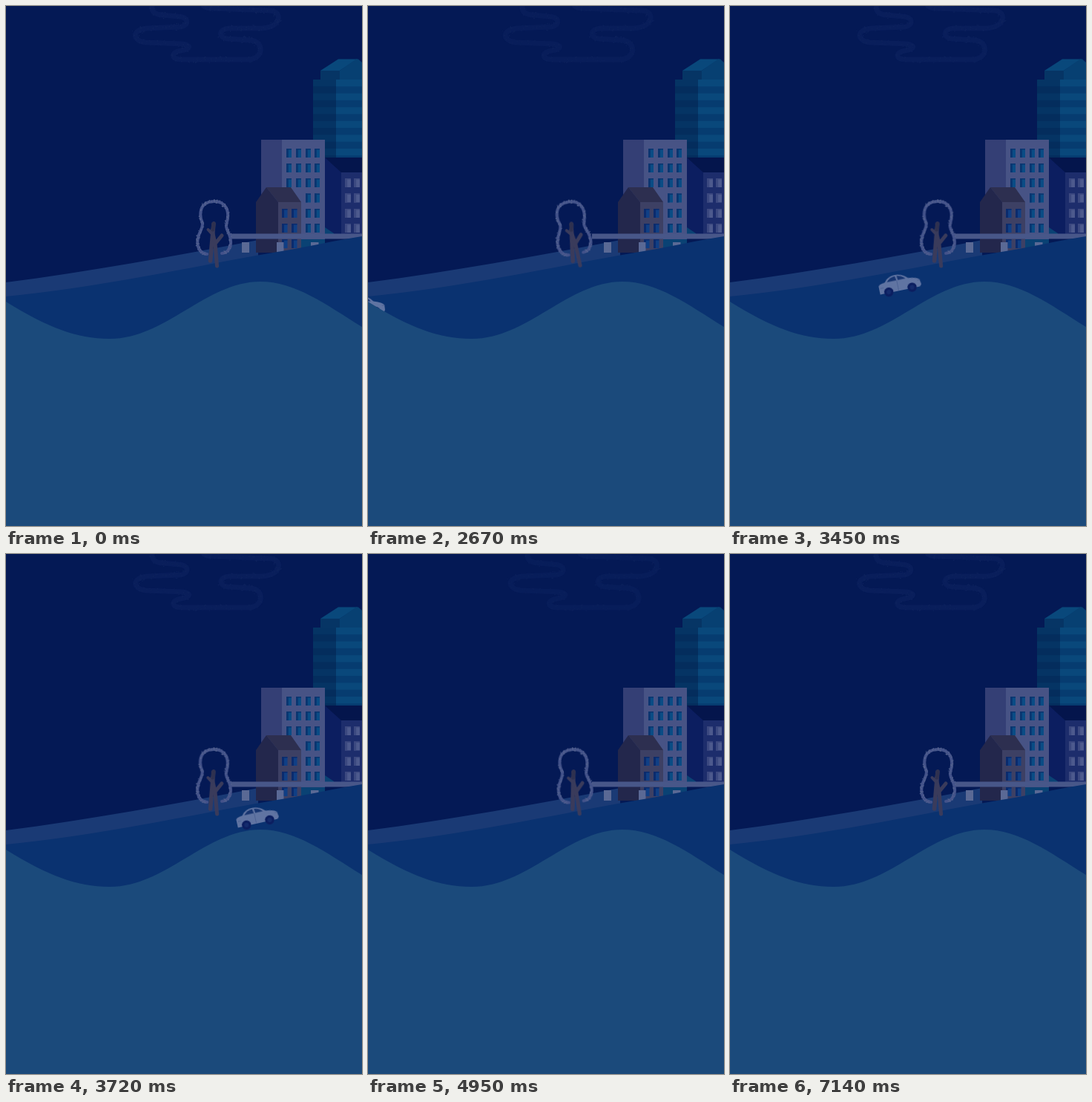
These frames come from a looping animation (480x700 px, 7.2 s). An HTML page:

```html
<!DOCTYPE html>
<html lang="en">
<head>
<meta charset="utf-8">
<title>Hillside at night</title>
<style>
  html, body { margin: 0; width: 100%; height: 100%; overflow: hidden; background: #041955; }
  svg { display: block; width: 100%; height: 100%; }
  #tree { transform-origin: 280px 338px; }
  #cloud { transform-origin: 170px 0; }
  .line { fill: none; stroke-linecap: round; stroke-linejoin: round; }
</style>
</head>
<body>
<svg viewBox="0 0 480 700" preserveAspectRatio="none">
  <rect width="480" height="700" fill="#041955"/>

  <g id="cloud">
    <path id="puff" class="line" stroke="#0a1f5c" stroke-width="7" d="M202 -8C192 3 197 11 210 12L232 14C247 15 247 26 236 28L190 30C169 32 170 47 188 49L238 51C251 53 248 58 236 60C222 62 222 72 236 72L328 72C348 70 348 48 330 46L298 44C286 42 287 31 300 30L345 30C372 29 374 6 354 6L275 3C266 2 264 -2 266 -6"/>
  </g>

  <path fill="#1a3a75" d="M0 372C110 358 225 337 340 315V345L0 400Z"/>

  <g id="tower">
    <path fill="#063565" d="M424 87H450V100H424Z"/>
    <path fill="#09487b" d="M424 87L448 71.500H474L450 87Z"/>
    <path fill="#074072" d="M450 100V87L472 71.500H475L480 76V100Z"/>
    <path fill="#053464" d="M414 99H445V210H414Z"/>
    <path fill="#063c70" d="M445 99H480V210H445Z"/>
  </g>

  <path fill="#0c1e60" d="M430 204L452 223V312H430Z"/>
  <path fill="#1d2d6c" d="M452 223H480V312H452Z"/>
  <path fill="#04154c" d="M430 204H480V224H452Z"/>

  <path fill="#343f75" d="M344 180H372V315H344Z"/>
  <path fill="#475385" d="M372 180H430V315H372Z"/>
  <path fill="#0a4274" d="M430 298L442 306V312H430ZM398 314H430V332H398Z"/>

  <path fill="#23274c" d="M337 264L351 244L367 264V332H337Z"/>
  <path fill="#2d2f50" d="M351 244H384L398 264H367Z"/>
  <path fill="#3d4064" d="M367 264H398V332H367Z"/>
  <g id="windows"></g>

  <path fill="#485789" d="M302 306.500H480V313.500H302Z"/>
  <path fill="#5a6995" d="M318 318H328V332H318ZM365 318H374.500V332H365ZM411 318H421.500V330H411Z"/>

  <path fill="#0a3270" d="M0 391C125 379 245 352 360 332C405 325 440 316 480 310V480H0Z"/>

  <g id="tree">
    <path id="crown" class="line" stroke="#43528a" stroke-width="4" d="M271 334C260 333 256.500 322 259 312C261 302 267 298 264.500 291C261.500 285 262 281 262.500 277C264 267 272 263 281 263C291 263 298 269 299 279C300 288 296.500 292 297 297C298 304 304 309 303 320C302 328 297 333 291 333"/>
    <g class="line" stroke="#3a3b5b">
      <path stroke-width="5.500" d="M275.500 343L278 314L280 293"/>
      <path stroke-width="5" d="M284.500 350L282 320L278 302M282 320L291 309"/>
      <path stroke-width="4" d="M278 307L272.500 301"/>
      <path stroke="#2f314f" stroke-width="5" d="M279 301L280 293"/>
    </g>
  </g>

  <g id="car">
    <path fill="#6074a2" d="M-28 1V-10Q-27 -13 -19 -13.500Q-14 -21 -4 -21Q6 -21 13 -13.500Q27 -12 28 -8L29 -2Q28 1 26 1Z"/>
    <path fill="#173571" d="M-16 -13.500Q-12 -19 -4 -19.300L-3 -13.500ZM-1.500 -19.300Q5 -18.500 9.500 -13.500H-1Z"/>
    <path class="line" stroke="#485d91" stroke-width=".8" d="M-2.500 -13V0M-26 -7H-22M25 -8H28"/>
    <circle cx="-16" r="6.200" fill="#0b1e60"/>
    <circle cx="16" r="6.200" fill="#0b1e60"/>
    <circle cx="-16" r="3" fill="#142b6d"/>
    <circle cx="16" r="3" fill="#142b6d"/>
  </g>

  <path fill="#1b4a7b" d="M0 398C55 432 95 448 140 448C215 448 270 371 343 371C390 371 430 401 480 432V700H0Z"/>
</svg>
<script>
const $ = id => document.getElementById(id);

function add(parent, tag, attrs) {
  const el = document.createElementNS('http://www.w3.org/2000/svg', tag);
  for (const k in attrs) el.setAttribute(k, attrs[k]);
  parent.append(el);
}

const rect = (parent, x, y, width, height, fill) =>
  add(parent, 'rect', { x, y, width, height, fill });

// tower floors
for (let i = 0; i < 6; i++) {
  const y = 99 + i * 18.6;
  rect($('tower'), 414, y + 9.3, 31, 9.3, '#042d5d');
  rect($('tower'), 445, y, 35, 9.3, '#09487b');
}

function windows(cols, rows, w, light, dark) {
  for (const y of rows) for (const x of cols) {
    rect($('windows'), x, y, w, 12, light);
    rect($('windows'), x, y, w * 0.4, 12, dark);
    rect($('windows'), x, y, w, 1.5, dark);
  }
}
const floors = [192, 212, 232, 252.5, 273, 293];
windows([378, 391], floors.slice(0, 3), 7, '#0a4c85', '#0a3570');
windows([404, 416], floors, 7, '#0a4c85', '#0a3570');
windows([457, 469], floors.slice(2), 8, '#4d5a8d', '#3c4980');
windows([372, 385], [273, 293, 314], 7.5, '#103f85', '#0b2b6d');

// chalky speckle along a stroke
let seed = 7;
const rnd = () => (seed = seed * 16807 % 2147483647) / 2147483647;
function speckle(path, count, spread, fill) {
  const len = path.getTotalLength();
  for (let i = 0; i < count; i++) {
    const p = path.getPointAtLength(rnd() * len);
    add(path.parentNode, 'circle', {
      cx: p.x + (rnd() - 0.5) * spread,
      cy: p.y + (rnd() - 0.5) * spread,
      r: 0.4 + rnd() * 0.5, fill
    });
  }
}
speckle($('puff'), 420, 9, '#10255f');
speckle($('crown'), 170, 5, '#55638f');

const sway = (id, to, duration) => $(id).animate([{}, to], {
  duration, iterations: Infinity, direction: 'alternate',
  easing: 'cubic-bezier(.37,0,.63,1)'
});
sway('cloud', { transform: 'translateX(20.5px) scaleX(1.028)', opacity: 0.75 }, 1800);
sway('tree', { transform: 'rotate(-7.5deg)' }, 900);

// time, x, y, tilt
const LOOP = 7200;
const drive = [
  [0, -64, 411, 2],
  [2370, -64, 411, 2],
  [2520, -35, 412, 2],
  [2670, -6, 411, 0],
  [2910, 50, 408, -6],
  [3150, 119, 400, -10.6],
  [3390, 205, 386.5, -11.5],
  [3720, 339.5, 361.5, -12.5],
  [4140, 512, 325, -12],
  [LOOP, 512, 325, -12]
];
$('car').animate(drive.map(([t, x, y, a]) => ({
  offset: t / LOOP,
  transform: `translate(${x}px, ${y}px) rotate(${a}deg)`
})), { duration: LOOP, iterations: Infinity });
</script>
</body>
</html>
```
